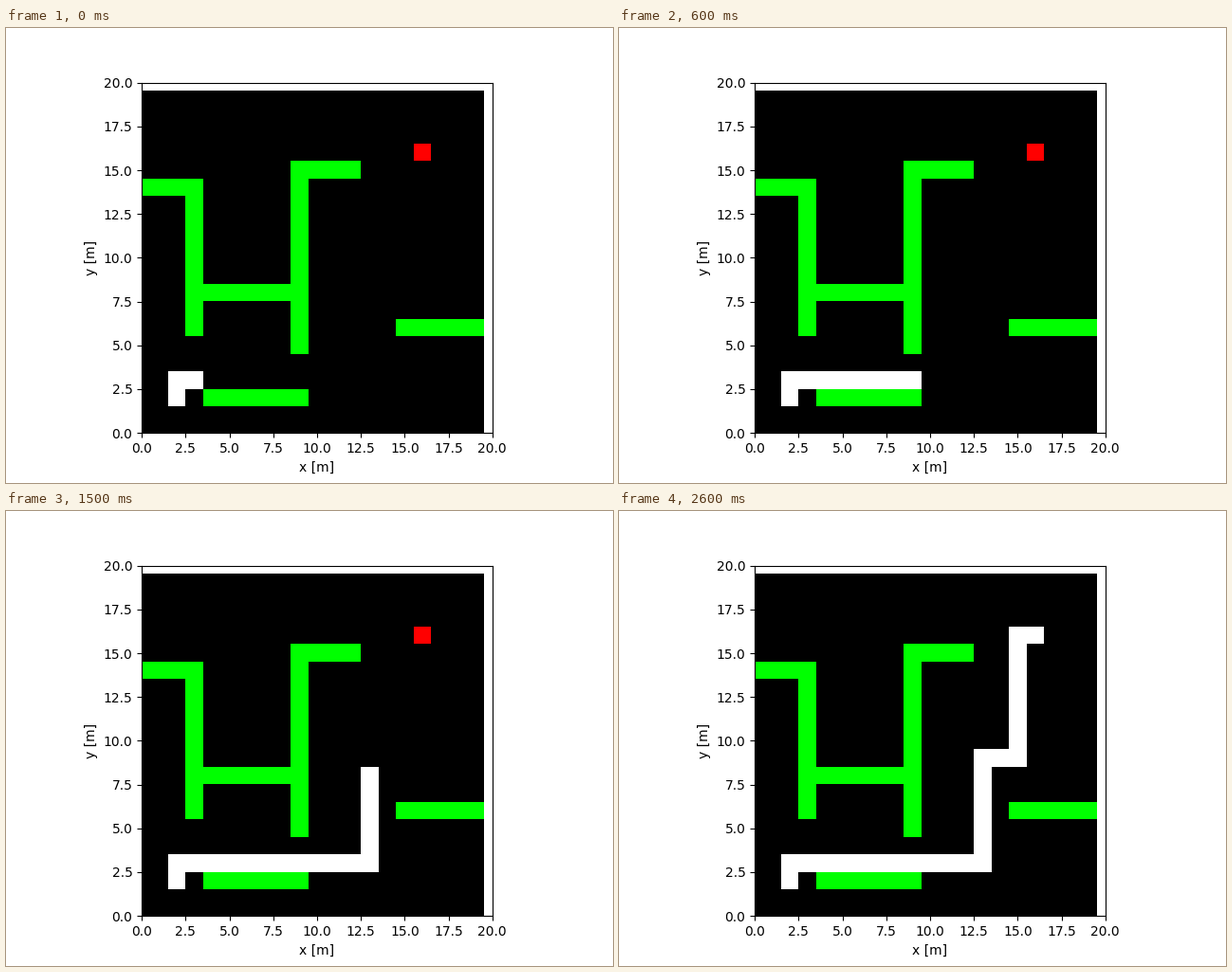
Write a matplotlib script that moves like this. It is 640 px wide and 480 px high and loops after 3.7 s.

```python
import numpy as np
import matplotlib.pyplot as plt
from matplotlib.animation import FuncAnimation

SIZE = 20
FRAMES = 37
INTERVAL = 100
START_CELLS = 3

BLACK, GREEN, RED, WHITE = (0, 0, 0), (0, 255, 0), (255, 0, 0), (255, 255, 255)


def walk(x, y, *legs):
    """List the cells of a walk whose legs alternate between x and y."""
    cells = [(x, y)]
    for i, leg in enumerate(legs):
        step = 1 if leg > 0 else -1
        for _ in range(abs(leg)):
            x, y = (x, y + step) if i % 2 else (x + step, y)
            cells.append((x, y))
    return cells


def paint(grid, cells, color):
    for x, y in cells:
        grid[y, x] = color


walls = [
    walk(0, 14, 3, -8),
    walk(3, 8, 6),
    walk(9, 5, 0, 10, 3),
    walk(15, 6, 4),
    walk(4, 2, 5),
]
route = walk(2, 2, 0, 1, 11, 6, 2, 7, 1)

base = np.full((SIZE, SIZE, 3), BLACK, dtype=np.uint8)
for wall in walls:
    paint(base, wall, GREEN)
paint(base, route[-1:], RED)

fig, ax = plt.subplots(figsize=(6.4, 4.8), dpi=100)
image = ax.imshow(base, origin="lower", interpolation="nearest")
ticks = np.linspace(0, SIZE, 9)
ax.set(xlim=(0, SIZE), ylim=(0, SIZE), xticks=ticks, yticks=ticks,
       xlabel="x [m]", ylabel="y [m]")


def update(frame):
    grid = base.copy()
    paint(grid, route[:START_CELLS + frame], WHITE)
    image.set_data(grid)
    return [image]


anim = FuncAnimation(fig, update, frames=FRAMES, interval=INTERVAL,
                     repeat=True, repeat_delay=0, blit=False)
plt.show()
```
